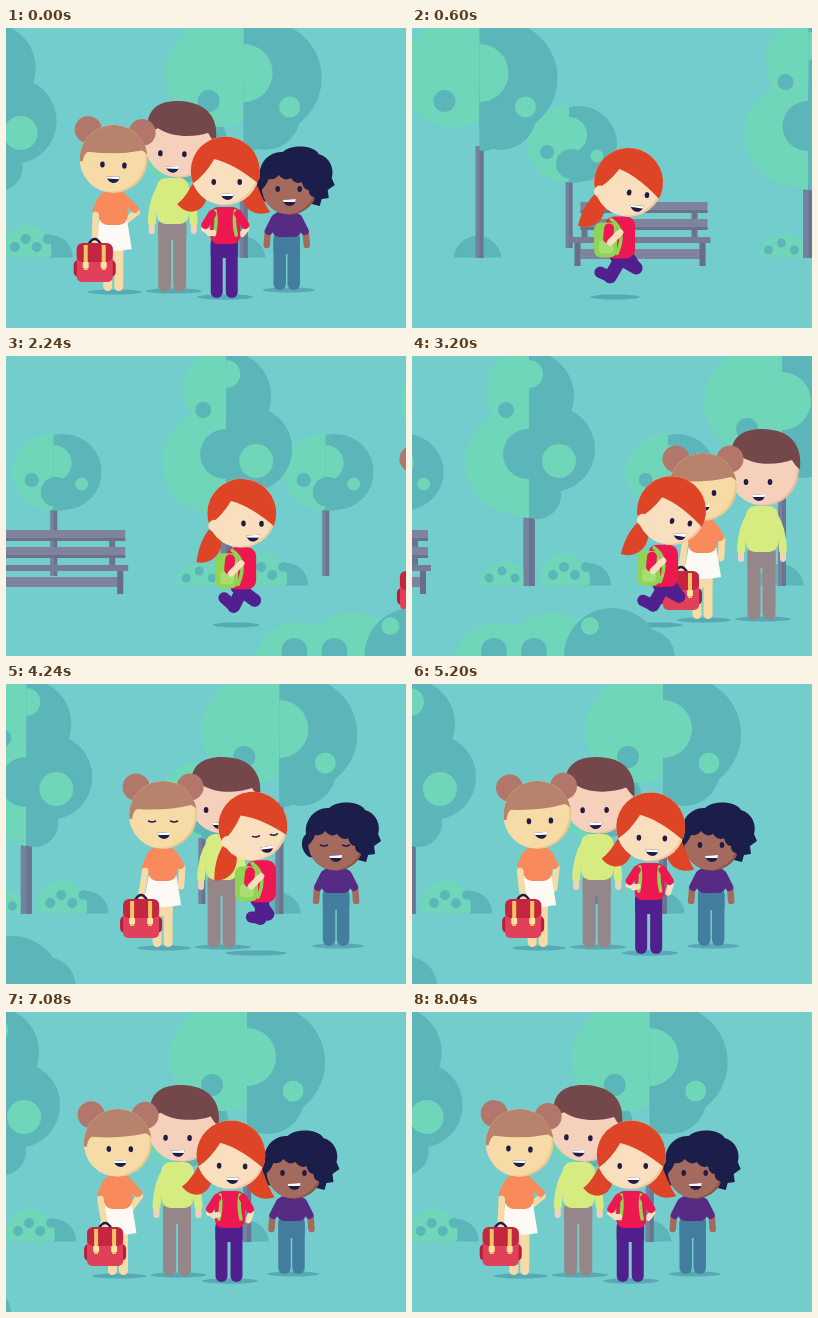
Animation of 400 by 300 pixels, one loop 8.08 s. Source, as an HTML page with a canvas:

```html
<!DOCTYPE html>
<html lang="en">
<head>
<meta charset="utf-8">
<title>Friends in the park</title>
<style>
html, body { margin: 0; width: 100%; height: 100%; overflow: hidden; background: #74cdcd; }
canvas { display: block; width: 400px; height: 300px; }
</style>
</head>
<body>
<canvas id="stage" width="400" height="300"></canvas>
<script>
const g = document.getElementById('stage').getContext('2d');
const LOOP = 8080, STEP = 40, STRIDE = 434;
const SKY = '#74cdcd', LIGHT = '#6fd6b9', DARK = '#5cb5b8', SHADOW = '#59a9b5';
const TRUNK = '#7482a0', TRUNK_DARK = '#69758f', INK = '#211b48';
const RED_HAIR = '#dd4526', RED_SKIN = '#f9dfbd', RED_RIM = '#f0caa2';
const PINK = '#ee1850', PANTS = '#521f8e', GREEN = '#8fd455';

// ---------- drawing helpers ----------
function ell(x, y, rx, ry, c) {
  g.fillStyle = c;
  g.beginPath();
  g.ellipse(x, y, rx, ry, 0, 0, Math.PI * 2);
  g.fill();
}
const circ = (x, y, r, c) => ell(x, y, r, r, c);
function box(x, y, w, h, c, r = 0) {
  g.fillStyle = c;
  g.beginPath();
  g.roundRect(x, y, w, h, r);
  g.fill();
}
function limb(c, w, ...p) {
  g.strokeStyle = c;
  g.lineWidth = w;
  g.lineCap = g.lineJoin = 'round';
  g.beginPath();
  g.moveTo(p[0], p[1]);
  if (p.length === 6) g.quadraticCurveTo(p[2], p[3], p[4], p[5]);
  else g.lineTo(p[2], p[3]);
  g.stroke();
}
function shape(d, c) {
  g.fillStyle = c;
  g.fill(new Path2D(d));
}
function at(x, y, deg, draw) {
  g.save();
  g.translate(x, y);
  g.rotate(deg * Math.PI / 180);
  draw();
  g.restore();
}
function clipped(x, y, w, h, draw) {
  g.save();
  g.beginPath();
  g.rect(x, y, w, h);
  g.clip();
  draw();
  g.restore();
}

// ---------- motion ----------
function ease(t, a, b) {
  const u = Math.min(1, Math.max(0, (t - a) / (b - a)));
  return u * u * (3 - 2 * u);
}
const mix = (a, b, u) => a + (b - a) * u;
const wave = turns => Math.cos(turns * Math.PI * 2);

// Steady pan that brakes exponentially into a slow drift.
const CRUISE = .1075, DRIFT = .0035, BRAKE = 3800, GLIDE = 53;
function camera(t) {
  const s = t - BRAKE, start = (BRAKE - 1200) * CRUISE;
  if (s < 0) return start + s * CRUISE;
  return start + GLIDE * (1 - Math.exp(-s * (CRUISE - DRIFT) / GLIDE)) + s * DRIFT;
}
const friendsX = t => 290 - (camera(t) - 215) * 1.385;
const walkX = t => Math.min(254, 217 + (t - 1200) * .0165);
const blinking = t => t >= 4160 && t < 4340;

// How far the group is in its middle pose and in its last pose.
function poses(t) {
  const end = ease(t, 6600, 7300);
  return { mid: ease(t, 5000, 5600) - end, end };
}

// ---------- scenery ----------
function trunk(x, y, h, w) {
  box(x - w / 2, y, w, h, TRUNK);
  box(x, y, w / 2, h, TRUNK_DARK);
}
// Crown with a light left half and a dark right half.
function crown(x, left, right) {
  clipped(x - 130, -20, 130, 320, () => left.forEach(([a, b, r]) => circ(x + a, b, r, LIGHT)));
  clipped(x, -20, 130, 320, () => right.forEach(([a, b, r]) => circ(x + a, b, r, DARK)));
}
function patch(x, y, r) {
  clipped(x, -20, 60, 200, () => circ(x, y, r, LIGHT));
}
function smallTree(x) {
  trunk(x, 140, 80, 7);
  crown(x, [[-4, 116, 38]], [[10, 116, 38], [4, 134, 21]]);
  patch(x, 107, 18);
  circ(x + 2, 136, 15, DARK);
  circ(x - 22, 124, 7, DARK);
  circ(x + 28, 128, 6.5, LIGHT);
}
function tallTree(x) {
  trunk(x, 120, 110, 11);
  crown(x, [[2, 34, 45], [-12, 106, 52], [0, 130, 32]], [[0, 40, 45], [23, 93, 43], [8, 139, 24]]);
  patch(x, 18, 14);
  circ(x - 1, 98, 25, DARK);
  circ(x - 23, 54, 8, DARK);
  circ(x + 30, 105, 17, LIGHT);
  bush(x);
}
function wideTree(x) {
  clipped(x - 40, 190, 100, 39.5, () => circ(x - 2, 232, 24, DARK));
  trunk(x, 118, 112, 8);
  crown(x, [[-25, 46, 53], [-12, 15, 48]], [[21, 50, 57], [21, 86, 36], [4, 100, 23]]);
  patch(x, 45, 29);
  circ(x - 35, 73, 11, DARK);
  circ(x + 46, 79, 10.5, LIGHT);
}
function bush(x) {
  clipped(x - 60, 185, 160, 44.5, () => {
    circ(x - 24, 232, 26, LIGHT);
    circ(x + 60, 229, 22, DARK);
    circ(x + 36, 222, 25, LIGHT);
    for (let i = 0; i < 4; i++) {
      circ(x - 40 + i * 13, 222 - i % 2 * 7, 4.5, DARK);
      circ(x + 24 + i * 11, 219 - i % 2 * 8, 5, DARK);
    }
  });
  trunk(x, 165, 65, 11);
}
function bench(x) {
  for (const px of [12, 122]) box(x + px, 174, 6, 40, TRUNK_DARK);
  for (const y of [174, 191]) {
    box(x + 11, y, 127, 11, '#7f839b');
    box(x + 11, y + 8, 127, 3, '#6e7289');
  }
  box(x + 11, 221, 125, 10, '#7f839b');
  for (const px of [5, 130]) box(x + px, 214, 6, 24, '#696e87');
  box(x, 209, 141, 6, '#777b94');
}
function frontBush(x) {
  circ(x + 85, 308, 42, LIGHT);
  circ(x + 140, 303, 47, LIGHT);
  circ(x + 200, 300, 48, DARK);
  circ(x + 234, 302, 29, DARK);
  for (const px of [82, 122]) circ(x + px, 295, 13, DARK);
  circ(x + 178, 270, 9, LIGHT);
}

// ---------- people parts ----------
// Eyes sit either side of x; the mouth hangs below.
function face(x, y, gap, drop, closed) {
  for (const ex of [x - gap, x + gap]) {
    if (closed) limb(INK, 1.5, ex - 3.5, y, ex, y + 2, ex + 3.5, y);
    else ell(ex, y, 2.3, 3, INK);
  }
  at(x, y + drop, 0, () => {
    g.clip(new Path2D('M-6 -2L7 -3C7 6 -4 6 -6 -2Z'));
    box(-8, -4, 16, 12, INK);
    box(-8, -4, 16, 4, '#fff');
  });
}
// Round head with a darker rim on the right; hair is painted inside the circle.
function head(r, skin, rim, hair) {
  g.save();
  g.beginPath();
  g.arc(0, 0, r, 0, Math.PI * 2);
  g.clip();
  circ(0, 0, r, rim);
  circ(-3, -2, r + 1, skin);
  if (hair) shape(...hair);
  g.restore();
}
function legs(x, top, foot, half, w, c) {
  for (const s of [-1, 1]) limb(c, w, x + s * half, top, x + s * half, foot - w / 2);
  box(x - half - w / 2, top - 6, half * 2 + w, 20, c, 4);
}
const redFringe = ['M-36 18L-33 13Q-20 4 -11 -12Q10 -7 36 15L40 -40L-40 -40Z', RED_HAIR];

// ---------- red-haired girl ----------
function redWalking(t) {
  const steps = (t - 1200) / STRIDE;
  const x = walkX(t), y = 204 - 8 * wave(steps + .04);
  const sway = -9.5 * wave(steps - .12);
  const hx = x + sway, hy = y - 54, turn = sway * .85;
  ell(x - 4, 269, 23 + (212 - y) / 2, 2.6, SHADOW);
  for (const [shift, off] of [[.5, 3], [0, -3]]) {
    const q = steps / 2 + shift, swing = wave(q - .3);
    const kx = x + 4 + 13 * swing, ky = y + 36 - 4.5 * wave(q - .33);
    limb(PANTS, 13, x + off, y + 20, kx, ky);
    limb(PANTS, 11.5, kx, ky, x - 4 + 15 * swing, y + 29 - 9 * wave(q - .42));
  }
  at(hx, hy, turn, () =>
    shape('M-24 10C-34 15 -42 30 -44 50C-32 52 -22 44 -20 34C-18 26 -20 18 -18 14Z', RED_HAIR));
  box(x - 14, y - 20, 30, 42, PINK, 9);
  box(x - 25, y - 14, 23, 35, GREEN, 7);
  box(x - 20, y + 4, 14, 13, '#a9df72', 4);
  limb(GREEN, 3.5, x - 8, y - 17, x + 8, y - 6, x - 2, y + 17);
  limb(PINK, 10, x - 10, y - 8, x - 11, y + 2);
  limb(RED_SKIN, 6.5, x - 9, y + 6, x + 1, y - 4);
  at(hx, hy, turn, () => {
    head(34.5, RED_SKIN, RED_RIM, redFringe);
    circ(-27, 13, 6, RED_SKIN);
    face(11, 10, 9, 14, blinking(t));
  });
}
function redStanding(t) {
  const { mid } = poses(t);
  const x = mix(walkX(t), friendsX(t) + 109.5, ease(t, 4500, 4850));
  ell(x + 3, 269, 28, 2.8, SHADOW);
  legs(x + 2, 216, 270, 7.5, 12, PANTS);
  at(x + 3 + mid * 4, 143, mid * 7, () => {
    shape('M-25 2C-31 6 -36 24 -48 33C-38 46 -20 42 -18 24Z', RED_HAIR);
    shape('M26 4C32 10 36 28 45 41C32 46 18 40 16 24Z', RED_HAIR);
  });
  limb(RED_SKIN, 6, x - 18, 201, x - 10, 206 - mid * 10);
  limb(RED_SKIN, 6, x + 24, 201, x + 20 + mid * 6, 206 + mid * 10);
  box(x - 12, 179, 30, 37, PINK, 8);
  for (const s of [-1, 1]) {
    limb(GREEN, 3.5, x + 3 + s * 10, 183, x + 3 + s * 8, 194, x + 3 + s * 11, 207);
    limb(PINK, 8, x + 3 + s * 13, 186, x + 3 + s * 20, 197);
  }
  limb(RED_SKIN, 6, x - 13, 205 - mid * 6, x - 9, 205 - mid * 9);
  at(x + 3 + mid * 4, 143, mid * 7, () => {
    head(34.5, RED_SKIN, RED_RIM, redFringe);
    face(1.5, 11, 13, 14, false);
  });
}

// ---------- girl with the bag ----------
function bag(x) {
  limb(INK, 2.5, x - 6, 216, x, 206, x + 6, 216);
  box(x - 21, 232, 42, 17, '#b51f38', 5);
  box(x - 18, 216, 36, 38, '#e0405a', 5);
  box(x - 18, 215, 36, 19, '#c4263f', 6);
  for (const s of [-9, 9]) {
    box(x + s - 2, 217, 4, 25, '#f0c565');
    box(x + s - 3, 234, 6, 6, '#fbe4a0', 1);
  }
}
function bunGirl(t, x) {
  const skin = '#f6dba6', hair = '#b7836d', bun = '#b2776a', top = '#f98a5c';
  const { mid, end } = poses(t);
  const bx = x - 21 + mid * 27 + end * 3;
  const ex = x + 20 - mid * 3 + end * 4;
  ell(x + 2, 264, 27, 2.6, SHADOW);
  legs(x + .5, 218, 263, 5.5, 9, skin);
  limb(skin, 6.5, ex, 184, x + 19 - mid * 8 - end * 5, 202 + mid * 9 - end * 10);
  shape(`M${x - 13} 190L${x + 14} 190L${x + 19} 221Q${x} 225 ${x - 19} 221Z`, '#fdfaf5');
  box(x - 14, 163, 29, 34, top, 9);
  limb(top, 8, x + 12, 171, ex - 2, 181);
  limb(top, 8, x - 11, 171, x - 16, 182);
  limb(skin, 6.5, x - 17, 187, mix(x - 17, bx, .35), 200, bx, 212);
  bag(bx);
  at(x + 1 - mid * 3, 131, -mid * 7 + end * 3, () => {
    for (const s of [-1, 1]) circ(s * 27, -28, 13.5, bun);
    head(34, skin, '#edc690',
      ['M-36 4L-31 4Q-30 -4 -26 -6Q4 -4 28 -10Q32 -8 36 -4L36 -40L-36 -40Z', hair]);
    face(mid * 9, 6, 11, 14, blinking(t));
  });
}

// ---------- tall boy ----------
function tallBoy(t, x) {
  const skin = '#f5d1bb', top = '#d7ec80', cloth = '#95868a', hair = '#74474a';
  const { mid, end } = poses(t);
  ell(x + 2, 263, 28, 2.6, SHADOW);
  legs(x + .5, 198, 264, 7.5, 13, cloth);
  for (const s of [-1, 1]) {
    limb(skin, 6, x + 1 + s * 21, 196, x + 1 + s * 21, 203);
    limb(top, 8, x + 1 + s * 12, 160, x + 1 + s * 20, 172, x + 1 + s * 21, 194);
  }
  box(x - 15, 150, 32, 46, top, 9);
  at(x + 3 - mid * 3 + end * 5, 115, end * 2 - mid * 3, () => {
    head(35, skin, '#e9bca3');
    shape('M-33 -4L-36 -12L-33 -16C-33 -33 -22 -42 -2 -42C24 -42 39 -28 36 -2C32 -4 30 -8 28 -11C14 -6 -8 -5 -22 -14C-28 -12 -31 -8 -33 -4Z', hair);
    face(-6 + mid * 8 - end, 11, 12, 15, false);
  });
}

// ---------- small boy ----------
function smallBoy(t, x) {
  const skin = '#a46a5d', hair = '#1b1d4b', top = '#572a84', jeans = '#447e9f';
  const { mid, end } = poses(t);
  ell(x + 2, 262, 26, 2.6, SHADOW);
  legs(x, 212, 262, 7, 12.5, jeans);
  for (const s of [-1, 1]) {
    limb(skin, 6.5, x + s * 19, 204, x + s * 20, 217);
    limb(top, 8, x + s * 12, 191, x + s * 18, 203);
  }
  box(x - 15, 184, 30, 25, top, 8);
  at(x + (mid + end) * 3, 159, 0, () => {
    shape('M-27 14C-36 8 -36 -4 -30 -9C-32 -24 -20 -36 -7 -35C2 -43 24 -42 29 -33C40 -30 45 -18 42 -9L45 -2L38 3L39 11L32 12L30 19L22 17L14 20Z', hair);
    head(28, skin, '#8c5749');
    shape('M-30 4Q-24 0 -21 -8Q-14 -7 -11 -12Q-5 -5 1 -9Q6 -2 12 -5Q14 3 19 3Q19 9 24 10Q26 15 30 12L31 -22L5 -36L-22 -28Z', hair);
    face(-1, 2, 11, 13, blinking(t));
  });
}

// ---------- scene ----------
function draw(time) {
  const t = time < STEP ? LOOP - STEP : time;
  const cam = camera(t), x = friendsX(t);
  box(0, 0, 400, 300, SKY);
  for (const px of [117, 389]) smallTree(px - cam * .62);
  for (const px of [3, 585]) wideTree(px - cam);
  tallTree(332 - cam);
  bench(93 - cam);
  tallBoy(t, x + 59);
  bunGirl(t, x);
  smallBoy(t, x + 174);
  if (t < 4560) redWalking(t);
  else redStanding(t);
  frontBush((215 - cam) * 2);
}
const start = performance.now();
function tick() {
  const t = (performance.now() - start) % LOOP;
  draw(Math.floor(t / STEP) * STEP);
  requestAnimationFrame(tick);
}
tick();
</script>
</body>
</html>
```
